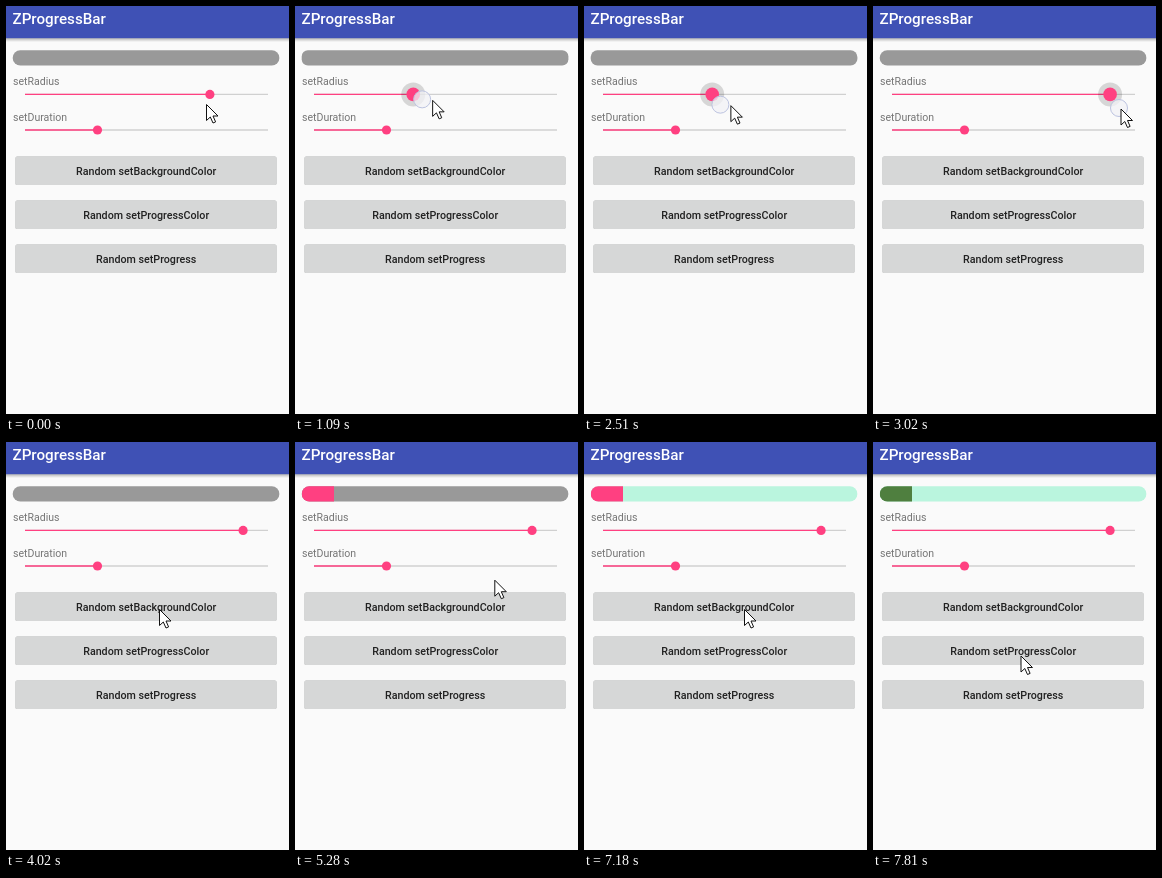
An HTML page that plays this animation: 283x408 px, repeating every 8 s.

```html
<!DOCTYPE html>
<html>
<head>
<meta charset="utf-8">
<style>
html, body { margin: 0; height: 100%; overflow: hidden; background: #fafafa; }
svg { display: block; width: 100vw; height: 100vh; }
text { font: 10.55px Roboto, sans-serif; fill: #757575; }
.title { font-size: 15.2px; font-weight: 500; fill: #fff; }
.button text { font-size: 10.7px; font-weight: 500; fill: #212121; text-anchor: middle; }
.button rect { fill: #d6d7d7; filter: drop-shadow(0 .7px .7px rgba(0, 0, 0, .3)); }
.button.pressed rect { filter: drop-shadow(0 1.2px 1.6px rgba(0, 0, 0, .4)); }
</style>
</head>
<body>
<svg viewBox="0 0 283 408">
  <defs>
    <linearGradient id="shade" x2="0" y2="1">
      <stop stop-color="#000" stop-opacity=".28"/>
      <stop offset="1" stop-color="#000" stop-opacity="0"/>
    </linearGradient>
    <clipPath id="pill"><rect id="pillShape" x="6.7" y="44.3" width="266.7" height="15.2"/></clipPath>
  </defs>
  <rect width="283" height="408" fill="#fafafa"/>
  <rect y="32" width="283" height="4" fill="url(#shade)"/>
  <rect width="283" height="32.2" fill="#3f51b5"/>
  <text class="title" x="6.5" y="17.5">ZProgressBar</text>
  <g clip-path="url(#pill)">
    <rect id="track" x="6" y="44" width="268" height="16"/>
    <rect id="fill" x="7" y="44" height="16"/>
  </g>
  <text x="7" y="78.8">setRadius</text>
  <text x="7" y="114.6">setDuration</text>
  <g id="sliders" stroke-width="1.4"></g>
  <g id="buttons"></g>
  <circle id="touch" r="8.5" fill="#f2f2f6" fill-opacity=".75" stroke="#bcc3e0"/>
  <path id="cursor" d="M.5 .5V16.5L4.3 13 7 19 9.6 17.9 7 12H12Z" fill="#fff" stroke="#111"/>
</svg>
<script>
const LOOP = 8000, TICK = 137, PINK = '#ff4081', MIN_X = 19;
const DRAG_START = 670, DRAG_STOP = 3020, DRAG_RELEASE = 3440;
const CLICK = { background: 6210, color: 7550, progress: 5010 }, HOLD = 130;

// Where the pointer glides, and when
const start = { x: 200, y: 98 };
const glides = [
  { from: 400, to: 674, x: 225, y: 93 },
  { from: 811, to: 1640, x: 20, y: 95 },
  { from: 1940, to: 3020, x: 247.5, y: 102.5 },
  { from: 3440, to: 4011, x: 153, y: 167 },
  { from: 4154, to: 4710, x: 144, y: 253 },
  { from: 5145, to: 5280, x: 199.3, y: 137.7 },
  { from: 5820, to: 6216, x: 162.5, y: 157.7 },
  { from: 7180, to: 7810, x: 147.5, y: 213.5 },
];

const $ = id => document.getElementById(id);
const set = (el, attrs) => Object.entries(attrs).forEach(([k, v]) => el.setAttribute(k, v));
const clamp = (v, lo, hi) => Math.max(lo, Math.min(hi, v));
const mix = (a, b, k) => a + (b - a) * k;
const within = (t, from, length) => t >= from && t < from + length;

const slider = y => `<g data-y="${y}">
  <path d="M${MIN_X} ${y}H262" stroke="#d0d0d0"/>
  <path class="done" stroke="${PINK}"/>
  <circle class="halo" cy="${y}" r="12" fill="#000" fill-opacity=".14"/>
  <circle class="thumb" cy="${y}" fill="${PINK}"/></g>`;
$('sliders').innerHTML = slider(88.4) + slider(124);

$('buttons').innerHTML = ['BackgroundColor', 'ProgressColor', 'Progress'].map((name, i) => `
  <g class="button" transform="translate(0 ${i * 44})">
    <rect x="9.5" y="150.5" width="261" height="28.5" rx="1.6"/>
    <text x="140.2" y="168.8">Random set${name}</text>
  </g>`).join('');

// Each glide advances in even ticks, the first one right at its start
function pointerAt(t) {
  let p = start;
  for (const g of glides) {
    if (t < g.from) break;
    const ticks = Math.round((g.to - g.from) / TICK);
    const tick = Math.floor((t - g.from) / (g.to - g.from) * ticks + 1e-6);
    const k = Math.min(1, (tick + 1) / (ticks + 1));
    p = { x: mix(p.x, g.x, k), y: mix(p.y, g.y, k) };
  }
  return p;
}

function radiusX(t) {
  const { x } = pointerAt(clamp(t, DRAG_START, DRAG_STOP));
  return Math.max(MIN_X, MIN_X + (x - 45) * 1.077);
}

function moveSlider(el, x, held) {
  set(el.querySelector('.done'), { d: `M${MIN_X} ${el.dataset.y}H${x}` });
  set(el.querySelector('.halo'), { cx: x, visibility: held ? 'visible' : 'hidden' });
  set(el.querySelector('.thumb'), { cx: x, r: held ? 6.8 : 4.6 });
}

function draw(now) {
  const t = now % LOOP;
  const { x, y } = pointerAt(t);
  const thumb = radiusX(t);
  const dragging = within(t, DRAG_START, DRAG_RELEASE - DRAG_START);
  const pressed = Object.values(CLICK).map(from => within(t, from, HOLD));

  const [radiusSlider, durationSlider] = $('sliders').children;
  moveSlider(radiusSlider, thumb, dragging);
  moveSlider(durationSlider, 91.5, false);
  set($('pillShape'), { rx: Math.min(7.6, (thumb - MIN_X) / 16) });
  set($('track'), { fill: t < CLICK.background + HOLD ? '#999' : '#baf5de' });
  set($('fill'), {
    width: 32 * clamp((t - CLICK.progress) / (2 * HOLD), 0, 1),
    fill: t < CLICK.color + HOLD ? PINK : '#4f7f3f',
  });
  [...$('buttons').children].forEach((b, i) => b.classList.toggle('pressed', pressed[i]));

  const lag = dragging && t < DRAG_STOP ? 10 : 1.5;
  const touching = dragging || pressed.includes(true);
  set($('touch'), { cx: x - lag, cy: y - .5, visibility: touching ? 'visible' : 'hidden' });
  set($('cursor'), { transform: `translate(${x} ${y})` });
}

(function loop() {
  draw(performance.now());
  requestAnimationFrame(loop);
})();
</script>
</body>
</html>
```
